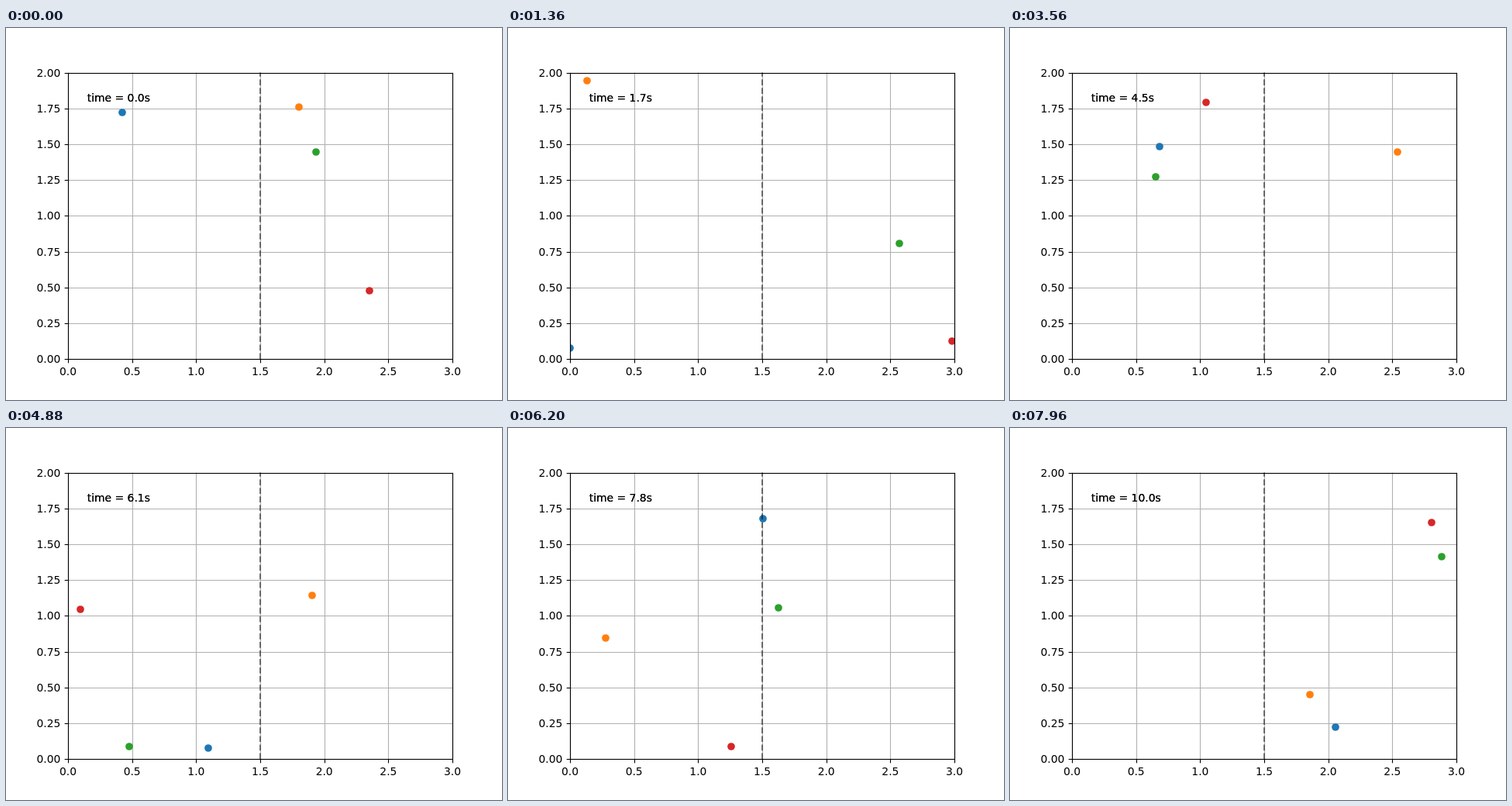
Write an HTML page with a canvas that moves like this. It is 640 by 480 pixels and loops after 8000 ms.

```html
<!DOCTYPE html>
<html lang="en">
<head>
<meta charset="utf-8">
<title>Particles in a box</title>
<style>
  html, body { margin: 0; width: 100%; height: 100%; overflow: hidden; background: #fff; }
  canvas { display: block; }
</style>
</head>
<body>
<canvas id="stage" width="640" height="480"></canvas>
<script>
const ctx = document.getElementById('stage').getContext('2d');

const FRAME_MS = 40, FRAMES = 200, DT = 0.05;
const WIDTH = 3, HEIGHT = 2, CONTACT = 0.15;
const LEFT = 80, RIGHT = 576, TOP = 57.6, BOTTOM = 427.2;
const LINE = 10 / 9, TICK = 4.86, RADIUS = 4.86;

const toX = x => LEFT + x / WIDTH * (RIGHT - LEFT);
const toY = y => BOTTOM - y / HEIGHT * (BOTTOM - TOP);
const crisp = p => Math.floor(p + 0.5) + 0.5;

// Velocities are per simulation step.
const particles = [
  { color: '#1f77b4', x: 0.4228, y: 1.7244, vx: -0.012478, vy: -0.048418 },
  { color: '#ff7f0e', x: 1.8049, y: 1.7603, vx: -0.04917, vy: 0.009042 },
  { color: '#2ca02c', x: 1.9346, y: 1.4437, vx: 0.03519, vy: -0.03552 },
  { color: '#d62728', x: 2.3525, y: 0.4794, vx: 0.03488, vy: -0.03583 }
];

function step(list) {
  const next = list.map(p => ({ ...p, x: p.x + p.vx, y: p.y + p.vy }));
  for (const p of next) {
    if (p.x < 0 || p.x > WIDTH) p.vx = -p.vx;
    if (p.y < 0 || p.y > HEIGHT) p.vy = -p.vy;
  }
  // Particles that touch exchange velocities.
  next.forEach((a, i) => next.slice(i + 1).forEach(b => {
    if (Math.hypot(a.x - b.x, a.y - b.y) < CONTACT) {
      [a.vx, b.vx] = [b.vx, a.vx];
      [a.vy, b.vy] = [b.vy, a.vy];
    }
  }));
  return next;
}

const states = [particles];
while (states.length < FRAMES) states.push(step(states[states.length - 1]));

function line(x1, y1, x2, y2, color, width = LINE) {
  ctx.strokeStyle = color;
  ctx.lineWidth = width;
  ctx.beginPath();
  ctx.moveTo(x1, y1);
  ctx.lineTo(x2, y2);
  ctx.stroke();
}

function text(content, x, y, align) {
  ctx.fillStyle = '#000';
  ctx.textAlign = align;
  ctx.fillText(content, x, y);
}

function drawGrid() {
  for (let i = 0; i <= 6; i++) {
    const x = crisp(toX(i / 2));
    line(x, TOP, x, BOTTOM, '#b0b0b0');
    line(x, 427.5, x, 427.5 + TICK, '#000');
    text((i / 2).toFixed(1), toX(i / 2), 448, 'center');
  }
  for (let i = 0; i <= 8; i++) {
    const y = crisp(toY(i / 4));
    line(LEFT, y, RIGHT, y, '#b0b0b0');
    line(80.5 - TICK, y, 80.5, y, '#000');
    text((i / 4).toFixed(2), 70.3, Math.round(toY(i / 4) + 5), 'right');
  }
}

function drawDots(list) {
  ctx.save();
  ctx.beginPath();
  ctx.rect(LEFT, TOP, RIGHT - LEFT, BOTTOM - TOP);
  ctx.clip();
  for (const p of list) {
    ctx.fillStyle = p.color;
    ctx.beginPath();
    ctx.arc(Math.round(toX(p.x)), Math.round(toY(p.y)), RADIUS, 0, 2 * Math.PI);
    ctx.fill();
  }
  ctx.restore();
}

function drawDivider() {
  ctx.setLineDash([7.708, 3.333]);
  line(328, BOTTOM, 328, TOP, 'rgba(0, 0, 0, 0.5)', 2.083);
  ctx.setLineDash([]);
}

// One decimal, with exact quarters rounded to the even digit.
function formatTime(t) {
  return (t % 1 === 0.25 ? t - 0.01 : t).toFixed(1);
}

function draw(now) {
  const frame = Math.floor(now / FRAME_MS) % FRAMES;
  ctx.fillStyle = '#fff';
  ctx.fillRect(0, 0, 640, 480);
  ctx.font = '13.889px "DejaVu Sans", sans-serif';
  drawGrid();
  drawDots(states[frame]);
  drawDivider();
  ctx.strokeStyle = '#000';
  ctx.lineWidth = LINE;
  ctx.strokeRect(80.5, 58.5, 496, 369);
  // Two overlaid labels give the slightly heavier type.
  const label = `time = ${formatTime(frame * DT)}s`;
  text(label, 104.8, 95, 'left');
  text(label, 104.8, 95, 'left');
}

let start;
function tick(now) {
  start ??= now;
  draw(now - start);
  requestAnimationFrame(tick);
}
draw(0);
requestAnimationFrame(tick);
</script>
</body>
</html>
```
